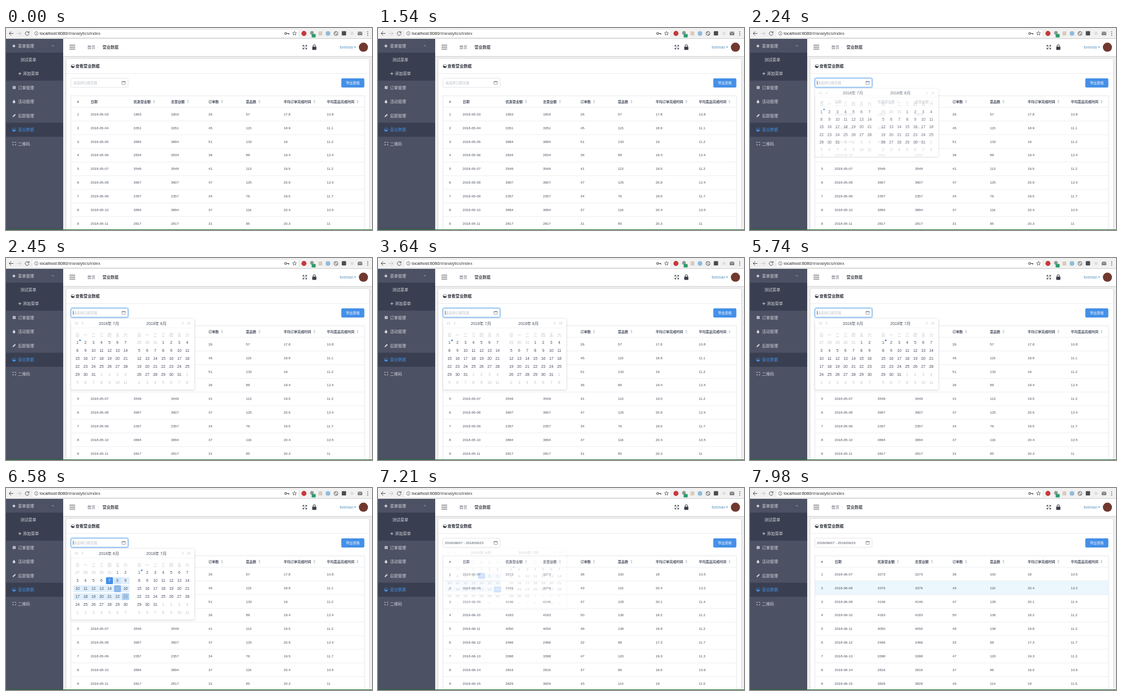
Recreate the animation shown at these times as an HTML page with a canvas. Size 640 by 353 pixels, loop 8 s.

```html
<!DOCTYPE html>
<html lang="zh-CN">
<head>
<meta charset="utf-8">
<title>营业数据</title>
<style>
html, body { margin: 0; width: 100%; height: 100%; overflow: hidden; background: #f0f0f0; }
canvas { display: block; width: 640px; height: 353px; }
</style>
</head>
<body>
<canvas id="stage"></canvas>
<script>
const W = 640, H = 353, LOOP = 8000;
const FONT = '"Liberation Sans", "Noto Sans CJK SC", "Noto Sans CJK", sans-serif';
const BLUE = '#4490e8', INK = '#495060', DARK = '#33373f', LINE = '#e6e8eb';
const OPEN = 2030, MONTH = 4340, CLOSE = 7010, LOAD = 7070, HOVER = 7480;
// Moments at which the range end moves to a new day.
const PICKS = [[6160, 7], [6300, 8], [6400, 15], [6510, 23]];

const dpr = window.devicePixelRatio || 1;
const canvas = document.getElementById('stage');
const layer = document.createElement('canvas');
for (const c of [canvas, layer]) {
  c.width = W * dpr;
  c.height = H * dpr;
}
const main = canvas.getContext('2d');
const overlay = layer.getContext('2d');
let ctx = main;

const clamp = v => Math.max(0, Math.min(1, v));
const ease = v => { v = clamp(v); return v * v * (3 - 2 * v); };

function rect(x, y, w, h, fill) {
  ctx.fillStyle = fill;
  ctx.fillRect(x, y, w, h);
}

function box(x, y, w, h, r, fill, stroke, lw = 0.7) {
  ctx.beginPath();
  ctx.roundRect(x, y, w, h, r);
  if (fill) { ctx.fillStyle = fill; ctx.fill(); }
  if (stroke) { ctx.strokeStyle = stroke; ctx.lineWidth = lw; ctx.stroke(); }
}

function shadowed(blur, dy, color, draw) {
  ctx.save();
  ctx.shadowColor = color;
  ctx.shadowBlur = blur * dpr;
  ctx.shadowOffsetY = dy * dpr;
  draw();
  ctx.restore();
}

function circle(x, y, r, fill, stroke, lw = 0.9) {
  ctx.beginPath();
  ctx.arc(x, y, r, 0, 7);
  if (fill) { ctx.fillStyle = fill; ctx.fill(); }
  if (stroke) { ctx.strokeStyle = stroke; ctx.lineWidth = lw; ctx.stroke(); }
}

// Strokes or fills an SVG path placed at x, y.
function icon(x, y, d, color, lw = 1, fill = false) {
  ctx.save();
  ctx.translate(x, y);
  const p = new Path2D(d);
  if (fill) { ctx.fillStyle = color; ctx.fill(p); }
  else { ctx.strokeStyle = color; ctx.lineWidth = lw; ctx.stroke(p); }
  ctx.restore();
}

// y is the visual middle of the line.
function text(s, x, y, size, color, align = 'left', weight = 400) {
  ctx.font = `${weight} ${size}px ${FONT}`;
  ctx.textAlign = align;
  ctx.fillStyle = color;
  ctx.fillText(s, x, y + size * 0.36);
}

function bowl(x, y, color) {
  circle(x, y, 3, null, color, 0.6);
  icon(x, y, 'M-3 0Q-1.5 -1 0 0T3 0A3 3 0 0 1 -3 0Z', color, 1, true);
}

function drawBrowser() {
  rect(0, 0, W, 19, '#f1f1f1');
  box(46, 2.5, 466, 14, 2, '#fff', '#dcdcdc', 0.6);
  rect(0, 18, W, 1, '#cfcfcf');
  icon(9, 9.5, 'M4 0H-3.5M0 -3.5L-3.5 0L0 3.5', '#555');
  icon(23, 9.5, 'M-4 0H3.5M0 -3.5L3.5 0L0 3.5', '#c4c4c4');
  icon(37, 9.5, 'M2.6 -2A3.3 3.3 0 1 0 3.3 0.6M3.3 -3.8V-1.2H0.6', '#555');
  circle(53, 9.5, 3.2, null, '#666', 0.8);
  rect(52.6, 9, 0.9, 2.3, '#666');
  rect(52.6, 7.5, 0.9, 0.9, '#666');
  text('localhost:8080', 59, 9.5, 7.5, '#222');
  const w = ctx.measureText('localhost:8080').width;
  text('/#/analytics/index', 59 + w, 9.5, 7.5, '#444');
  circle(489, 9.5, 1.7, null, '#555', 1.1);
  icon(491, 9.5, 'M0 0H4V2M2.5 0V1.6', '#555');
  icon(504.5, 9.3, 'M0 -3.6L1 -1.1L3.6 -1L1.6 0.7L2.3 3.2L0 1.8L-2.3 3.2L-1.6 0.7L-3.6 -1L-1 -1.1Z', '#555', 0.8);
  circle(521, 9.5, 4.4, '#c8393c');
  circle(535, 8.5, 3.2, '#8c9b94');
  box(534.5, 10.5, 7, 6, 1, '#2c9c6a');
  box(546.5, 6, 6.5, 7, 0, '#d8cbbd');
  circle(563, 9.5, 4, '#8fbbdc');
  circle(577, 9.5, 3.4, null, '#555', 1);
  icon(577, 9.5, 'M-2.4 -2.4L2.4 2.4', '#555');
  box(587.2, 5.5, 7.5, 7.5, 1, '#484b50');
  circle(605, 9.5, 2.8, '#dedede');
  box(615, 6.5, 8, 6, 0.5, '#777');
  icon(619, 9, 'M-3.8 -2L0 1L3.8 -2', '#f1f1f1', 0.8);
  for (const y of [6.5, 9.5, 12.5]) circle(632.5, y, 0.85, '#555');
}

function drawSidebar() {
  rect(0, 19, 100, 333, '#4c5164');
  rect(0, 43, 100, 49, '#393f50');
  rect(0, 165.5, 100, 24.5, '#393f50');
  const c = '#d5d7dc';
  const items = [['菜单管理', 31], ['订单管理', 104], ['活动管理', 128.5], ['后厨管理', 153], ['营业数据', 177.5], ['二维码', 202]];
  for (const [s, y] of items) text(s, 21, y, 7, y === 177.5 ? BLUE : c);
  text('测试菜单', 25, 55.1, 7, c);
  text('添加菜单', 29.5, 79.7, 7, c);
  icon(24.2, 79.7, 'M-2.6 0H2.6M0 -2.6V2.6', c, 0.9);
  icon(82, 31, 'M-2 1L0 -1L2 1', '#b6bac4', 0.7);
  icon(14, 31, 'M-2.8 -0.8H2.2Q2.2 2.6 0 2.6Q-2.2 2.6 -2.8 -0.8ZM-1 -2.6H0.6V-1.2H-1Z', c, 1, true);
  box(11.8, 101.4, 5, 5.2, 0.6, c);
  icon(14.3, 104, 'M-1.3 -0.9H1.3M-1.3 0.8H1.3', '#4c5164', 0.6);
  icon(14, 128.5, 'M0 -3.2Q4 2 1.2 2.8Q0 3.2 -1.2 2.8Q-4 2 0 -3.2Z', c, 1, true);
  icon(14.2, 153, 'M-2.8 2.8L-2.2 0.8L1.4 -2.8L2.9 -1.3L-0.8 2.2Z', c, 1, true);
  bowl(14.2, 177.7, BLUE);
  icon(14.5, 202, 'M-2.6 -1V-2.4H-1M1 -2.4H2.6V-1M2.6 1V2.4H1M-1 2.4H-2.6V1', c, 0.9);
}

function drawHeader() {
  shadowed(2, 1, 'rgba(0,0,0,.14)', () => rect(100, 19, 540, 30, '#fff'));
  for (const y of [30, 33.4, 36.8]) rect(111, y - 0.5, 10, 1, '#444');
  text('首页', 142.3, 33.4, 7, '#5d6370');
  text('/', 161.5, 33.4, 6, '#dddee1', 'center');
  text('营业数据', 168.8, 33.4, 7, '#4a4d55', 'left', 700);
  icon(522.5, 33.5, 'M-3.3 -1V-3.3H-1M1 -3.3H3.3V-1M3.3 1V3.3H1M-1 3.3H-3.3V1M-3 -3L-0.8 -0.8M3 -3L0.8 -0.8M3 3L0.8 0.8M-3 3L-0.8 0.8', '#3a3f4a', 1);
  box(535.5, 32.6, 7.2, 5.6, 0.8, '#3a3f4a');
  icon(539.1, 32.6, 'M-2 0V-1.4A2 2 0 0 1 2 -1.4V0', '#3a3f4a', 1.1);
  text('foreman', 607, 33.8, 6.4, '#5b93bd', 'right');
  icon(610.3, 33.6, 'M-1.9 -1H1.9L0 1.2Z', '#5b93bd', 1, true);
  circle(625, 33.6, 8, '#71382f');
}

function drawInput(focus, value) {
  const draw = () => box(113.5, 87.7, 100, 16, 2, '#fff', focus ? '#5a9fe8' : '#dddee1', 0.8);
  if (focus) shadowed(3, 0, 'rgba(45,140,240,.45)', draw);
  else draw();
  if (value) text(value, 117, 95.8, 6.2, INK);
  else text('请选择日期范围', 117.6, 95.8, 6, '#bcc0c8');
  if (focus) rect(117, 92.3, 0.7, 7, '#333');
  box(202.7, 93.3, 6, 5.2, 0.5, null, '#80848f', 0.7);
  rect(202.7, 93, 6, 1.5, '#80848f');
}

const HEADS = [['#', 126], ['日期', 148], ['优惠营业额', 223], ['总营业额', 288.5], ['订单数', 354], ['菜品数', 419.5], ['平均订单完成时间', 485.5], ['平均菜品完成时间', 561]];
// Each row: income, orders, dishes, order minutes, dish minutes.
const parse = s => s.split(',').map(r => r.split(' '));
const MAY = parse('1803 26 57 17.8 10.8,3351 45 115 18.9 11.1,3884 51 133 19 11.2,2834 36 89 19.4 12.4,3549 41 113 19.5 11.2,3907 47 125 20.9 12.4,2357 34 76 19.5 11.7,3894 37 116 20.4 10.5,2817 31 85 20.3 11');
const JUNE = parse('3273 38 100 18 10.5,3376 43 110 20.4 13.2,4146 47 129 20.1 11.4,4183 50 136 18.2 11.2,4050 49 138 19.8 11.2,2466 32 68 17.3 11.7,3398 47 120 19.3 11.3,2816 37 96 16.5 10.6,3829 43 114 19 11.5');

function drawTable(t) {
  const loaded = t >= LOAD, rows = loaded ? JUNE : MAY;
  HEADS.forEach(([s, x], i) => {
    text(s, x, 128.7, 6, INK, i ? 'left' : 'center', 700);
    if (i < 2) return;
    const sx = x + s.length * 6 + 5.7;
    icon(sx, 128.7, 'M-1.8 -0.6L0 -2.6L1.8 -0.6ZM-1.8 0.8L0 2.8L1.8 0.8Z', '#b4b8bf', 1, true);
  });
  const hover = clamp((t - HOVER) / 200);
  if (hover) rect(113.5, 162.4, 513.5, 24, `rgba(235,247,253,${hover})`);
  rows.forEach((r, i) => {
    const y = 150.5 + i * 23.9;
    rect(113.5, y - 12.3, 513.5, 0.7, LINE);
    const day = (loaded ? 7 : 3) + i;
    const date = `2018-0${loaded ? 6 : 5}-${String(day).padStart(2, '0')}`;
    const cells = [i + 1, date, r[0], ...r];
    cells.forEach((s, k) => text(s, HEADS[k][1], y, 6.15, INK, k ? 'left' : 'center'));
  });
  ctx.strokeStyle = '#dfe1e5';
  ctx.lineWidth = 0.8;
  ctx.strokeRect(113.5, 118.5, 513.5, 260);
}

function drawCard(t) {
  rect(100, 49, 540, 304, '#f0f0f0');
  shadowed(3, 0.5, 'rgba(0,0,0,.2)', () => box(105.5, 54, 529.5, 320, 2, '#fff'));
  rect(105.5, 79, 529.5, 0.8, LINE);
  bowl(116.8, 66.6, DARK);
  text('查看营业数据', 121.4, 66.5, 7.1, DARK, 'left', 700);
  box(586.3, 88, 40.3, 16, 2, BLUE);
  text('导出表格', 606.5, 96, 6, '#fff', 'center');
  drawInput(t >= OPEN && t < CLOSE, t >= CLOSE ? '2018/06/07 - 2018/06/23' : '');
  drawTable(t);
}

// Last day in the range, 0 before the first click.
const rangeEnd = t => PICKS.reduce((end, [at, day]) => t >= at ? day : end, 0);

// How strongly a day is marked as an end of the range, faded over 200 ms.
function endMark(day, t) {
  const i = PICKS.findIndex(p => p[1] === day);
  if (i < 0) return 0;
  const stays = i === 0 || i === PICKS.length - 1;
  const fadeOut = stays ? 0 : clamp((t - PICKS[i + 1][0]) / 200);
  return clamp((t - PICKS[i][0]) / 200) * (1 - fadeOut);
}

function drawMonth(x, month, t) {
  const first = new Date(2018, month - 1, 1).getDay();
  const days = new Date(2018, month, 0).getDate();
  const before = new Date(2018, month - 1, 0).getDate();
  const end = month === 6 ? rangeEnd(t) : 0;
  [...'日一二三四五六'].forEach((s, i) => text(s, x + i * 14, 134.2, 6.6, '#b9bdc5', 'center'));
  for (let i = 0; i < 42; i++) {
    const cx = x + i % 7 * 14, cy = 148 + Math.floor(i / 7) * 13.95;
    const d = i - first + 1;
    if (d < 1 || d > days) {
      text(d < 1 ? before + d : d - days, cx, cy, 6.9, '#c3c6cc', 'center');
      continue;
    }
    const mark = end ? endMark(d, t) : 0;
    if (end && d >= 7 && d <= end) rect(cx - 7, cy - 6, 14, 12, '#e1effc');
    if (mark) box(cx - 6, cy - 6, 12, 12, 1.5, `rgba(68,144,232,${mark})`);
    const mix = v => v + (255 - v) * mark;
    text(d, cx, cy, 6.9, `rgb(${mix(73)},${mix(80)},${mix(96)})`, 'center');
    if (month === 7 && d === 1) circle(cx + 4.4, cy - 4, 1.4, '#3f7fd6');
  }
}

function drawPanel(t) {
  const left = t < MONTH ? 7 : 6;
  shadowed(3, 0.5, 'rgba(0,0,0,.25)', () => box(113.5, 106, 216, 124.3, 2, '#fff'));
  rect(113.5, 121.8, 216, 0.6, '#eceef0');
  text(`2018年 ${left}月`, 180, 114, 7, INK, 'center');
  text(`2018年 ${left + 1}月`, 263, 114, 7, INK, 'center');
  const g = '#b9bdc5';
  icon(123.5, 114, 'M-0.6 -2.2L-2.6 0L-0.6 2.2M2.4 -2.2L0.4 0L2.4 2.2', g, 0.8);
  icon(134, 114, 'M1 -2.2L-1 0L1 2.2', g, 0.8);
  icon(309, 114, 'M-1 -2.2L1 0L-1 2.2', g, 0.8);
  icon(319.5, 114, 'M0.6 -2.2L2.6 0L0.6 2.2M-2.4 -2.2L-0.4 0L-2.4 2.2', g, 0.8);
  drawMonth(125, left, t);
  drawMonth(233, left + 1, t);
}

// The panel is drawn on its own layer so that it fades as one piece.
function drawPicker(t) {
  const show = ease((t - OPEN) / 300) * (1 - ease((t - CLOSE) / 300));
  if (show <= 0) return;
  const top = 105.5, sy = 0.8 + 0.2 * show;
  ctx = overlay;
  ctx.setTransform(dpr, 0, 0, dpr, 0, 0);
  ctx.clearRect(0, 0, W, H);
  ctx.transform(1, 0, 0, sy, 0, top * (1 - sy));
  drawPanel(t);
  ctx = main;
  ctx.globalAlpha = show;
  ctx.drawImage(layer, 0, 0, W, H);
  ctx.globalAlpha = 1;
}

function render(t) {
  ctx.setTransform(dpr, 0, 0, dpr, 0, 0);
  drawCard(t);
  drawPicker(t);
  drawHeader();
  drawSidebar();
  drawBrowser();
  rect(0, 352, W, 1, '#1f6e2c');
}

const start = performance.now();
function tick() {
  render((performance.now() - start) % LOOP);
  requestAnimationFrame(tick);
}
tick();
</script>
</body>
</html>
```
